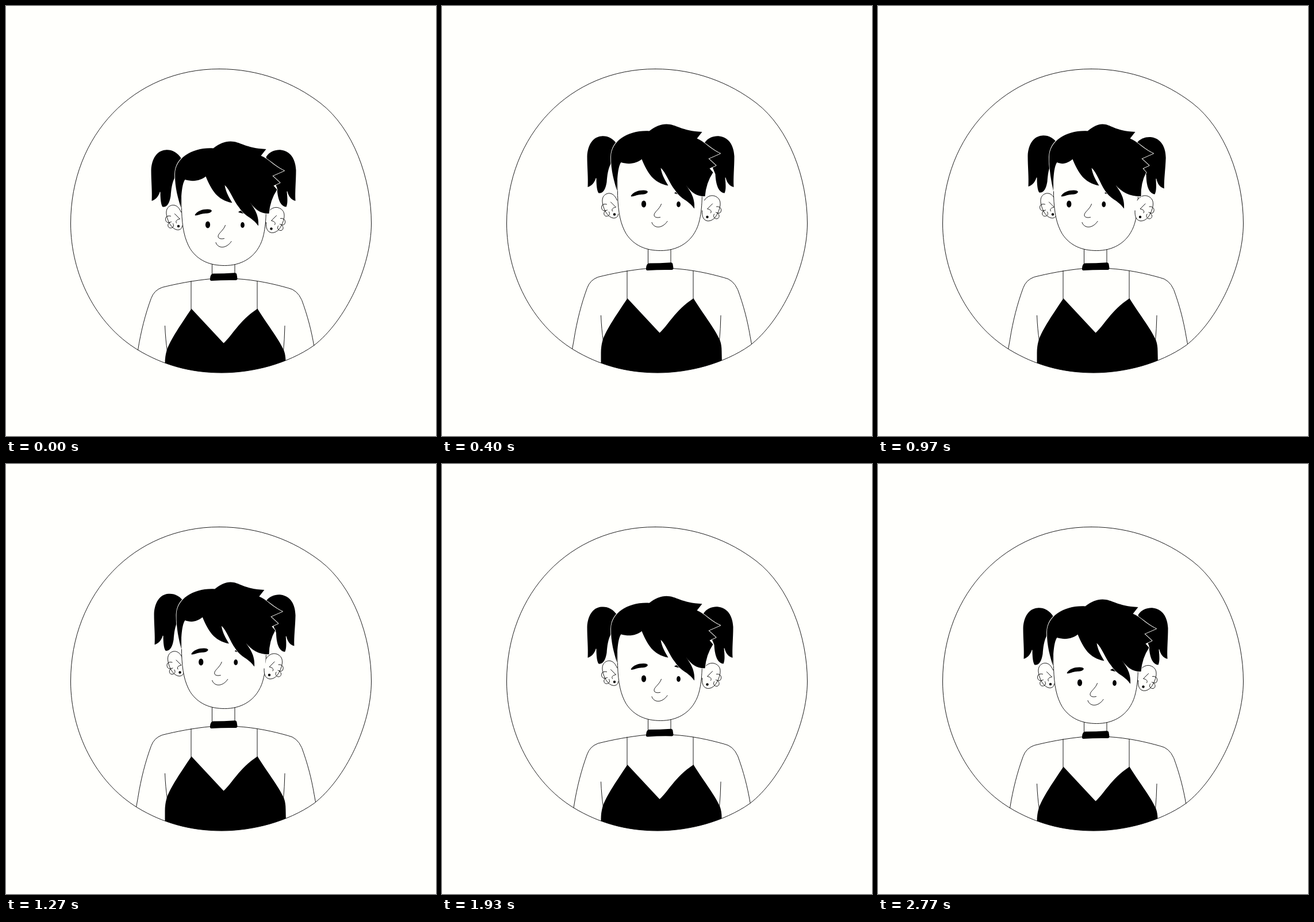
Recreate the animation shown at these times as an HTML page with a canvas. Size 748 px wide and 748 px high, loop 2810 ms.

```html
<!DOCTYPE html>
<html lang="en">
<head>
<meta charset="utf-8">
<title>Portrait</title>
<style>
html, body { margin: 0; width: 100%; height: 100%; overflow: hidden; background: #fffffc; }
canvas { display: block; }
</style>
</head>
<body>
<canvas id="stage" width="748" height="748"></canvas>
<script>
const ctx = document.getElementById('stage').getContext('2d');
const LOOP = 2810, STEP = 100 / 3;
const INK = '#000', PAPER = '#fffffc';
const path = d => new Path2D(d);

const frame = path(`M371 109.5 C440 109.5 500 133 547 169 C604 213 635.5 300 635.5 378
  C635.5 453 591 548 535 591 C490 622 430 638 375 638 C320 638 272 624 229 598
  C155 553 112.5 465 112.5 378 C112.5 225 222 109.5 371 109.5Z`);

const body = {
  lines: path(`M358 430 V468 M397.5 430 V468
    M357 474 C325 477 295 483 271 489 Q257 494 252 508 C242 535 234 566 229 598 L224 626
    M400 474 C435 476 465 483 490 490 Q506 493 514 511 C524 538 531 565 535.5 592 L541 622
    M321.5 478 V527 M436.5 478 V527
    M276 556 Q277 580 280 600 M484.5 556 Q484 580 482 600`),
  collar: path(`M360 465 Q379 465 397 463.8 Q400.5 463.5 401 467 L402 473.5
    Q402 476.5 399 476.5 Q378 476 357 477.5 Q354 477.5 354.5 474 Q355 465 360 465Z`),
  dress: path(`M322 526 L378 586 C393 573 404 548 437 526 C450 548 474 578 483 599
    Q486 607 486 618 L487 665 H276 V621 Q276 609 279 599 C285 580 305 552 322 526Z`)
};

const ponyL = path(`M305 266 C298 253 286 249 277 250 C262 251 253 265 252 285
  C252 305 254 322 253 338.5 C259 337 265 331 267 323 H268 C268 335 269 345 272 349
  C280 350 284 342 286 330 C287 318 288 307 294 296 C294 285 297 273 305 266Z`);
const ponyR = path(`M452 262 C458 252 470 249 478 250 C494 252 503 265 504 285
  C504 305 502 322 503 338.5 C496 337 491 331 489 322 H488 C489 333 490 343 487 349
  C478 348 472 338 471 316 L458 285Z`);

const earL = {
  shape: path(`M304 358 C300 348 294 345 288 346 C280 348 277 355 279 364
    C281 375 288 388 298 389 C303 389 306 386 306 382`),
  lines: path(`M293 361 L302 370 C296 371 294 374 296 377
    M286 365 C279 363 275 368 278 374 Q281 378 287 375
    M284 376 C279 379 281 387 287 385.5 C291 385 292 381 290 378`),
  stud: [299.5, 382.5]
};
const earR = {
  shape: path(`M456 358 C460 351 468 348 475 351 C484 355 485 363 482 373
    C478 385 472 394 462 394 C455 393 451.5 388 452 376`),
  lines: path(`M470 364 L461 373 C467 374 469 377 467 380
    M477 369 C484 368 487 374 484 379 Q481 382 476 379
    M478 380 C484 383 482 391 476 390 C472 389 471 385 473 382`),
  stud: [461, 387]
};

const face = path(`M305 315 V355 C306 385 310 405 320 422 C334 443 355 451 380 451
  C408 451 430 438 441 416 C447 405 452 385 452 350`);
const browL = path(`M328 363 C332 356 341 353 350 353 Q357 353 357.5 356
  C355 360.5 350 360 345 360.5 C338 361 333 364 329 364Z`);
const browR = path('M404 357.5 C409 353.5 420 355 430 362 V368 C420 360 411 361 404 358.5Z');
const nose = path('M381 381 C378 390 368.5 395 368.5 400 C368.5 405 375 405 379 404');
const mouth = path('M364.5 411 C368 422 383 422 391.5 409');

// k is the head turn: the fringe slides further than the silhouette
function hairPath(k) {
  const l = 4 * k, r = -5 * k, f = -9 * k, b = -11 * k;
  return path(`M${304 + k / 2} 351 C${299 + l / 2} 335 ${293 + l} 315 ${293.5 + l} 292
    C${294 + l} 263 ${325 + l} 245 ${360 + l} 247
    C${370 + l} 239 ${380 + l / 2} 235 390 235
    C${407 + r / 2} 235 ${416 + r} 247 ${452 + r} 248.5 L${443 + r} 260
    C${456 + r} 265 ${468 + r} 280 ${483.5 + r} 286
    L${463 + r} 295 L${476 + r} 307 L${465 + r} 312 L${471 + r} 319
    Q${459 + r / 2} 337 457 360.5 C${443 + f / 2} 361 ${433 + f} 354 ${424 + b} 341
    C${430 + b} 350 ${440 + b} 362 ${438.5 + b} 382
    C${427 + b} 366 ${416 + b} 367 ${405 + b} 350
    C${395 + f} 338 ${389 + f} 319 ${380 + f} 311
    C${382 + f} 324 ${388 + f} 333 ${393 + f} 342
    C${367 + f} 337 ${357 + f} 320 ${347 + f} 296
    C${338 + f} 303 ${326 + f / 2} 306 311 301.5
    C306 308 304 327 ${304 + k / 2} 351Z`);
}

const clamp = v => Math.max(0, Math.min(1, v));
const ease = (t, a, b) => (1 - Math.cos(Math.PI * clamp((t - a) / (b - a)))) / 2;
const hump = (t, a, b) => Math.sin(Math.PI * clamp((t - a) / (b - a)));
const rise = (t, lag = 0) => ease(t, 0, 400) - ease(t - lag, 1600, 2070);

function at(x, y, draw) {
  ctx.save();
  ctx.translate(x, y);
  draw();
  ctx.restore();
}

function fill(p, color = INK) {
  ctx.fillStyle = color;
  ctx.fill(p);
}

function line(p, color = INK, width = 0.9) {
  ctx.strokeStyle = color;
  ctx.lineWidth = width;
  ctx.stroke(p);
}

function oval(x, y, rx, ry) {
  ctx.fillStyle = INK;
  ctx.beginPath();
  ctx.ellipse(x, y, rx, ry, 0, 0, 2 * Math.PI);
  ctx.fill();
}

function pony(p, px, py, dx, dy, angle) {
  at(px + dx, py + dy, () => {
    ctx.rotate(angle * Math.PI / 180);
    ctx.translate(-px, -py);
    fill(p);
  });
}

function ear(e, dx, dy) {
  at(dx, dy, () => {
    fill(e.shape, PAPER);
    line(e.shape);
    line(e.lines);
    oval(...e.stud, 2.2, 2.2);
  });
}

function drawHead(t, u, k) {
  const swing = hump(t, 1400, 1750);
  const ponyY = -24 * (rise(t, -50) - 0.045 * hump(t, 2070, 2600));
  pony(ponyL, 300, 265, 8 * k, ponyY - k, -2 * swing);
  pony(ponyR, 457, 262, 4 * rise(t, 100) - 7 * k, ponyY + k, 2 * k - 0.5 * swing);

  ear(earL, 4 * k, -20.5 * u);
  at(0, -26 * u, () => {
    fill(face, PAPER);
    line(face);
  });
  ear(earR, -5.5 * k, -20.5 * u);

  at(-10 * k, -33 * u, () => {
    fill(browL);
    fill(browR);
  });
  at(-18.7 * k, -36 * u, () => {
    oval(350.5, 380, 4.1, 6);
    oval(411, 380.5, 3.4, 5);
  });
  at(-10 * k, -37 * u, () => line(nose));
  at(-10 * k, -35 * u, () => line(mouth));

  at(0, -30 * u, () => {
    const hair = hairPath(k);
    line(hair, PAPER, 1.8);
    fill(hair);
  });
}

function render(t) {
  const up = rise(t);
  const u = up - 0.045 * hump(t, 2070, 2600);
  const k = ease(t, 470, 870) - ease(t, 1100, 1500);

  ctx.fillStyle = PAPER;
  ctx.fillRect(0, 0, 748, 748);
  ctx.lineCap = ctx.lineJoin = 'round';

  ctx.save();
  ctx.clip(frame);
  at(0.5, 0.5 - 18 * up, () => {
    line(body.lines);
    fill(body.collar);
    fill(body.dress);
  });
  ctx.restore();
  line(frame);
  at(0.5, 0.5, () => drawHead(t, u, k));
}

const start = performance.now();
function tick() {
  const t = (performance.now() - start) % LOOP;
  // frame times are rounded to 10 ms, so step a little early
  render(Math.floor((t + 4) / STEP) * STEP);
  requestAnimationFrame(tick);
}
tick();
</script>
</body>
</html>
```
